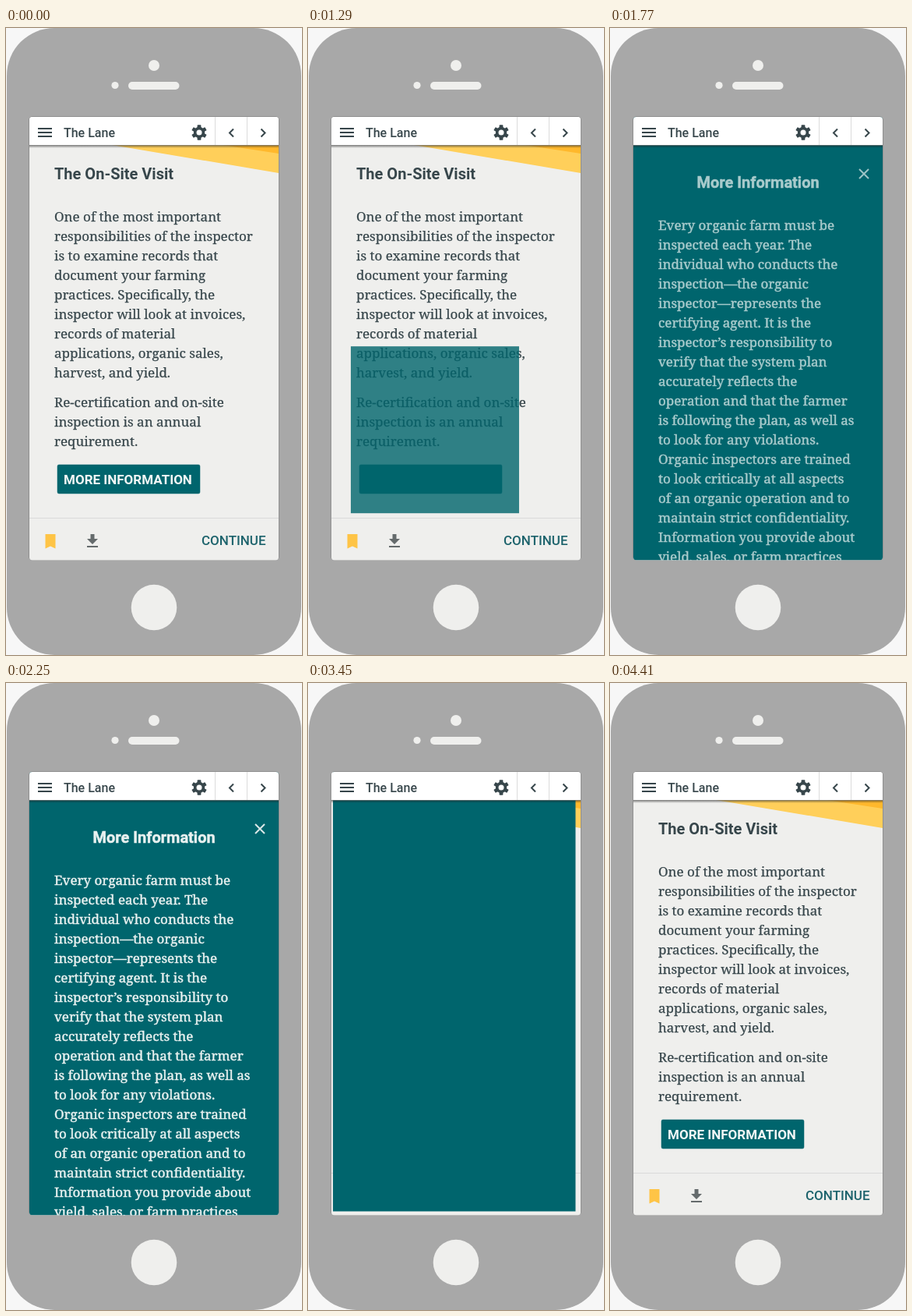
Write an HTML page that moves like this. It is 380x804 px and loops after 4440 ms.

```html
<!DOCTYPE html>
<html lang="en">
<head>
<meta charset="utf-8">
<title>Lesson panel</title>
<style>
  html, body { margin: 0; width: 100%; height: 100%; overflow: hidden; background: #f7f7f7; }
  svg { display: block; }
  text { font-family: Roboto, sans-serif; font-weight: 500; fill: #37464b; }
  .head { font-size: 20px; font-weight: 700; }
  .body text { font: 400 17px "Noto Serif", serif; stroke: #37464b; stroke-width: .25; }
  .light text { fill: #e9f1f0; stroke: #e9f1f0; stroke-width: .45; }
  .line { fill: none; stroke: #37464b; stroke-width: 2; }
</style>
</head>
<body>
<svg width="380" height="804" viewBox="0 0 380 804">
  <defs>
    <clipPath id="screen"><rect x="30" y="114" width="320" height="568.5" rx="4"/></clipPath>
    <linearGradient id="shade" x2="0" y2="1">
      <stop offset="0" stop-color="#222" stop-opacity=".6"/>
      <stop offset="1" stop-color="#222" stop-opacity="0"/>
    </linearGradient>
    <rect id="tooth" x="-2.4" y="-9.8" width="4.8" height="19.6" rx=".8"/>
  </defs>

  <rect x="1" width="378" height="804" rx="61" fill="#a8a8a8"/>
  <g fill="#efefed">
    <circle cx="190" cy="48" r="7"/>
    <circle cx="140" cy="73.5" r="4.6"/>
    <rect x="157" y="69" width="65.5" height="10" rx="5"/>
    <circle cx="190" cy="743" r="29.3"/>
  </g>

  <rect x="29.5" y="113.5" width="321" height="569" rx="4.5" fill="none" stroke="#8f8f8f"/>
  <g clip-path="url(#screen)">
    <rect x="30" y="114" width="320" height="569" fill="#efefed"/>
    <path d="M136 150H350V186Z" fill="#ffcf5a"/>
    <path d="M278 150H350V161Z" fill="#ffb82c"/>
    <text class="head" x="62" y="193.5">The On-Site Visit</text>
    <g id="lesson" class="body"></g>

    <rect x="66" y="560" width="183" height="37" rx="2" fill="#00656d" stroke="#00656d" stroke-opacity=".5"/>
    <text id="label" x="74" y="584.5" font-size="17" style="font-weight:700;fill:#f2f6f5">MORE INFORMATION</text>

    <path d="M30 628.5H350" stroke="#dadada"/>
    <path d="M50.5 649H63.5V667.5L57 664.5L50.5 667.5Z" fill="#fec446"/>
    <path d="M108.5 649H113.5V655H118L111 662L104 655H108.5ZM104 664H118V666H104Z" fill="#656b6c"/>
    <text x="251" y="662.5" font-size="17" style="fill:#1d636c">CONTINUE</text>

    <rect id="panel" fill="#00656d"/>
    <g id="info" class="light">
      <text class="head" x="111.5" y="204.5">More Information</text>
      <path d="M320 181L332 193M332 181L320 193" stroke="#d9e7e7" stroke-width="2"/>
      <g id="details" class="body"></g>
    </g>

    <rect x="30" y="114" width="320" height="36.5" fill="#fff"/>
    <rect x="30" y="150" width="320" height="4" fill="url(#shade)"/>
    <path d="M268.5 114V150M309.5 114V150" stroke="#dcdcdc"/>
    <path class="line" d="M41 129H59M41 134H59M41 139H59M292 129.5L287 134.5L292 139.5M327.5 129.5L332.5 134.5L327.5 139.5"/>
    <text x="74" y="140" font-size="16">The Lane</text>
    <g transform="translate(248 134)" fill="#37464b">
      <use href="#tooth"/>
      <use href="#tooth" transform="rotate(60)"/>
      <use href="#tooth" transform="rotate(120)"/>
      <circle r="7.2"/>
      <circle r="3.5" fill="#fff"/>
    </g>
  </g>
</svg>
<script>
const LOOP = 4440;
const $ = id => document.getElementById(id);

function addLines(id, y, copy) {
  copy.split("|").forEach((words, i) => {
    const line = document.createElementNS("http://www.w3.org/2000/svg", "text");
    line.setAttribute("x", 62);
    line.setAttribute("y", y + 25 * i);
    line.textContent = words;
    $(id).append(line);
  });
}

addLines("lesson", 248, "One of the most important|responsibilities of the inspector|" +
  "is to examine records that|document your farming|practices. Specifically, the|" +
  "inspector will look at invoices,|records of material|applications, organic sales,|harvest, and yield.");
addLines("lesson", 486, "Re-certification and on-site|inspection is an annual|requirement.");
addLines("details", 259, "Every organic farm must be|inspected each year. The|" +
  "individual who conducts the|inspection—the organic|inspector—represents the|" +
  "certifying agent. It is the|inspector’s responsibility to|verify that the system plan|" +
  "accurately reflects the|operation and that the farmer|is following the plan, as well as|" +
  "to look for any violations.|Organic inspectors are trained|to look critically at all aspects|" +
  "of an organic operation and to|maintain strict confidentiality.|Information you provide about|" +
  "yield, sales, or farm practices");

const ramp = (t, from, to) => Math.min(1, Math.max(0, (t - from) / (to - from)));
const ease = p => p < .5 ? 2 * p * p : 1 - 2 * (1 - p) ** 2;
const mix = (a, b, p) => a + (b - a) * p;

function draw(now) {
  const t = now % LOOP;
  const open = ease(ramp(t, 1150, 1510)) - ease(ramp(t, 3390, 3750));
  const left = mix(66, 30, open), right = mix(236, 350, open);
  const top = mix(557, 72, open), bottom = mix(595.5, 682.5, open);
  const box = { x: left, y: top, width: right - left, height: bottom - top,
    opacity: ramp(t, 1150, 1325) - ramp(t, 3740, 3900) };
  for (const key in box) $("panel").setAttribute(key, box[key]);
  $("info").setAttribute("opacity", ramp(t, 1510, 1870) - ramp(t, 3255, 3420));
  $("label").setAttribute("opacity", 1 - ramp(t, 1150, 1280) + ramp(t, 3700, 3860));
}

const start = performance.now();
function tick() {
  draw(performance.now() - start);
  requestAnimationFrame(tick);
}
tick();
</script>
</body>
</html>
```
